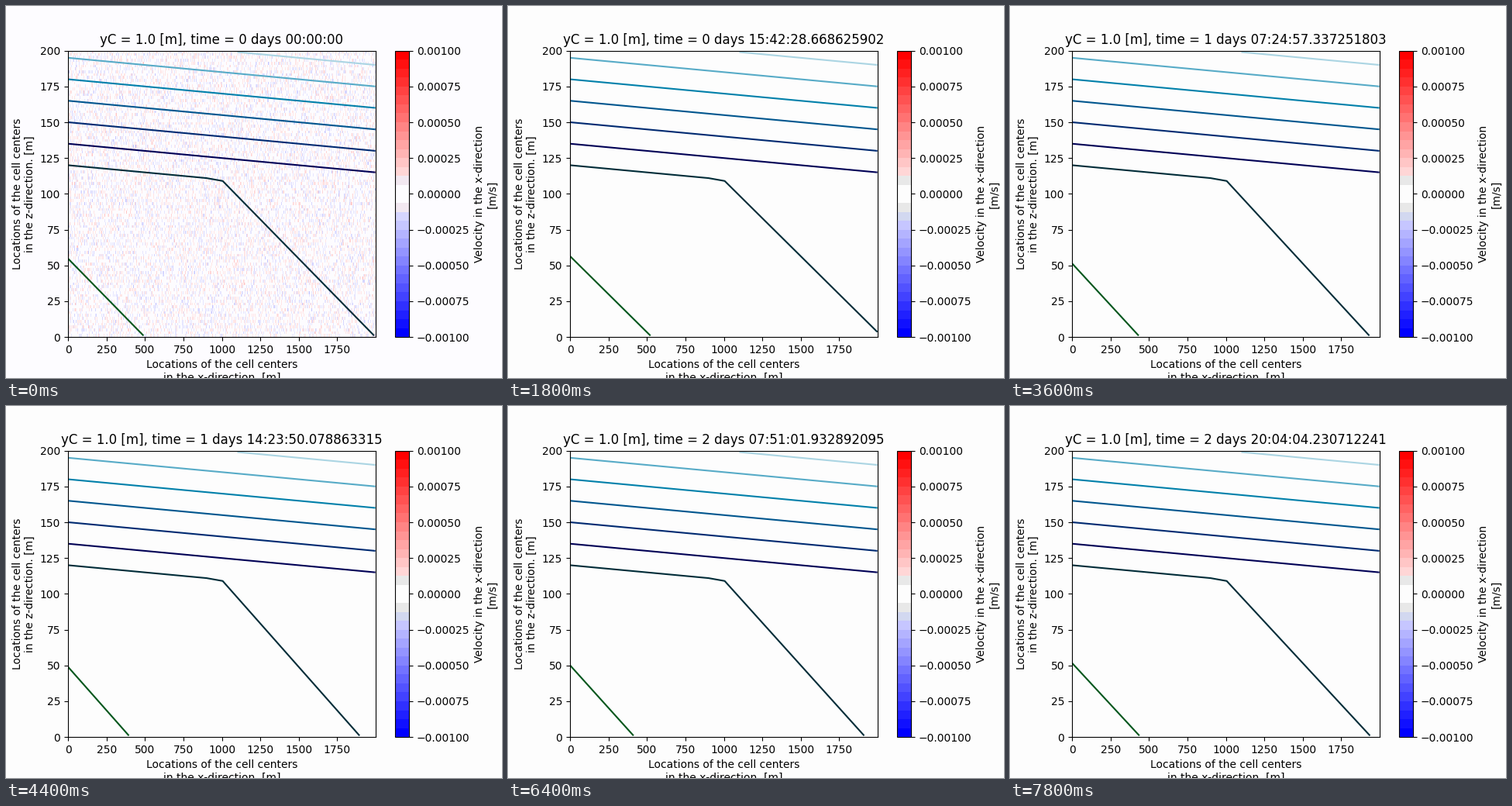
Write a matplotlib script that moves like this. It is 640 px wide and 480 px high and loops after 8 s.

```python
import numpy as np
import matplotlib.pyplot as plt
from matplotlib.animation import FuncAnimation
from matplotlib.cm import ScalarMappable
from matplotlib.colors import ListedColormap, Normalize

FRAMES, INTERVAL = 40, 200
STEP_NS = 6283185402877.97      # simulated time per frame
BANDS = 32
X_MAX = 1998
PIVOT_Z = 109                   # deep isolines swing about this height

# Frames at which the drift of the bottom intercepts turns
KEYS = [0, 4, 9, 14, 22, 32, 39]
FOOT = [1990, 1940, 2022, 1970, 1895, 1912, 1937]


def band_cmap(page, inner, low=None):
    colors = plt.get_cmap("bwr")(np.linspace(0, 1, BANDS))
    mid = BANDS // 2
    colors[mid - 1:mid + 1] = plt.matplotlib.colors.to_rgba(page)
    if inner:
        colors[[mid - 2, mid + 1]] = plt.matplotlib.colors.to_rgba(inner)
    if low:
        colors[mid - 3] = plt.matplotlib.colors.to_rgba(low)
    return ListedColormap(colors)


START_PAGE, PAGE = "#fdfcff", "#fdfdfd"
start_field = band_cmap(START_PAGE, None)
start_bar = band_cmap(START_PAGE, "#f2e8f1")
calm = band_cmap(PAGE, "#e8e8e8", "#d2d8f0")

noise = np.random.default_rng(7).standard_normal((100, 500))
norm = Normalize(-0.001, 0.001)

fig, ax = plt.subplots(figsize=(6.4, 4.8), dpi=100)
bar = ScalarMappable(norm, start_bar)
cbar = fig.colorbar(bar, ax=ax, label="Velocity in the x-direction\n[m/s]")
cbar.set_ticks(np.linspace(-0.001, 0.001, 9))
field = ax.imshow(noise * 0, cmap=start_field, norm=norm, origin="lower",
                  extent=(-1, 1999, 0, 200), aspect="auto",
                  interpolation="nearest")
ax.set(xlim=(-1, 1999), ylim=(0, 200),
       xlabel="Locations of the cell centers\nin the x-direction. [m]",
       ylabel="Locations of the cell centers\nin the z-direction. [m]")
title = ax.set_title("")


def isoline(level, xs=(), zs=()):
    color = plt.get_cmap("ocean")(level / 9)
    return ax.plot(xs, zs, color=color, lw=1.5, solid_capstyle="butt")[0]


for k in range(5):
    z = 135 + 15 * k
    isoline(3 + k, [0, X_MAX], [z, z - X_MAX / 100])
isoline(8, [1100, X_MAX], [199, 210 - X_MAX / 100])
green = isoline(1)
dark = isoline(2)


def clock(i):
    ns = round(i * STEP_NS)
    sec, frac = divmod(ns, 10**9)
    days, sec = divmod(sec, 86400)
    text = f"{days} days {sec // 3600:02d}:{sec // 60 % 60:02d}:{sec % 60:02d}"
    return text + (f".{frac:09d}" if frac else "")


def velocity(i):
    v = noise * 6.5e-5 * (1 + i) ** -0.8
    if i:
        v[56:] = 0      # the upper layer settles at once
    return v


def update(i):
    page = PAGE if i else START_PAGE
    fig.set_facecolor(page)
    field.set_cmap(calm if i else start_field)
    field.set_data(velocity(i))
    bar.set_cmap(calm if i else start_bar)
    title.set_text(f"yC = 1.0 [m], time = {clock(i)}")

    foot = np.interp(i, KEYS, FOOT)
    slope = (PIVOT_Z - 1) / (foot - 1005)
    end = min(foot, X_MAX)
    dark.set_data([0, 900, 1005, end],
                  [120, 111, PIVOT_Z, PIVOT_Z - slope * (end - 1005)])
    green.set_data([0, foot - 1500], [1 + slope * (foot - 1500), 1])
    return field, dark, green, title


anim = FuncAnimation(fig, update, frames=FRAMES, interval=INTERVAL,
                     init_func=lambda: update(0), repeat=True, repeat_delay=0)
plt.show()
```
